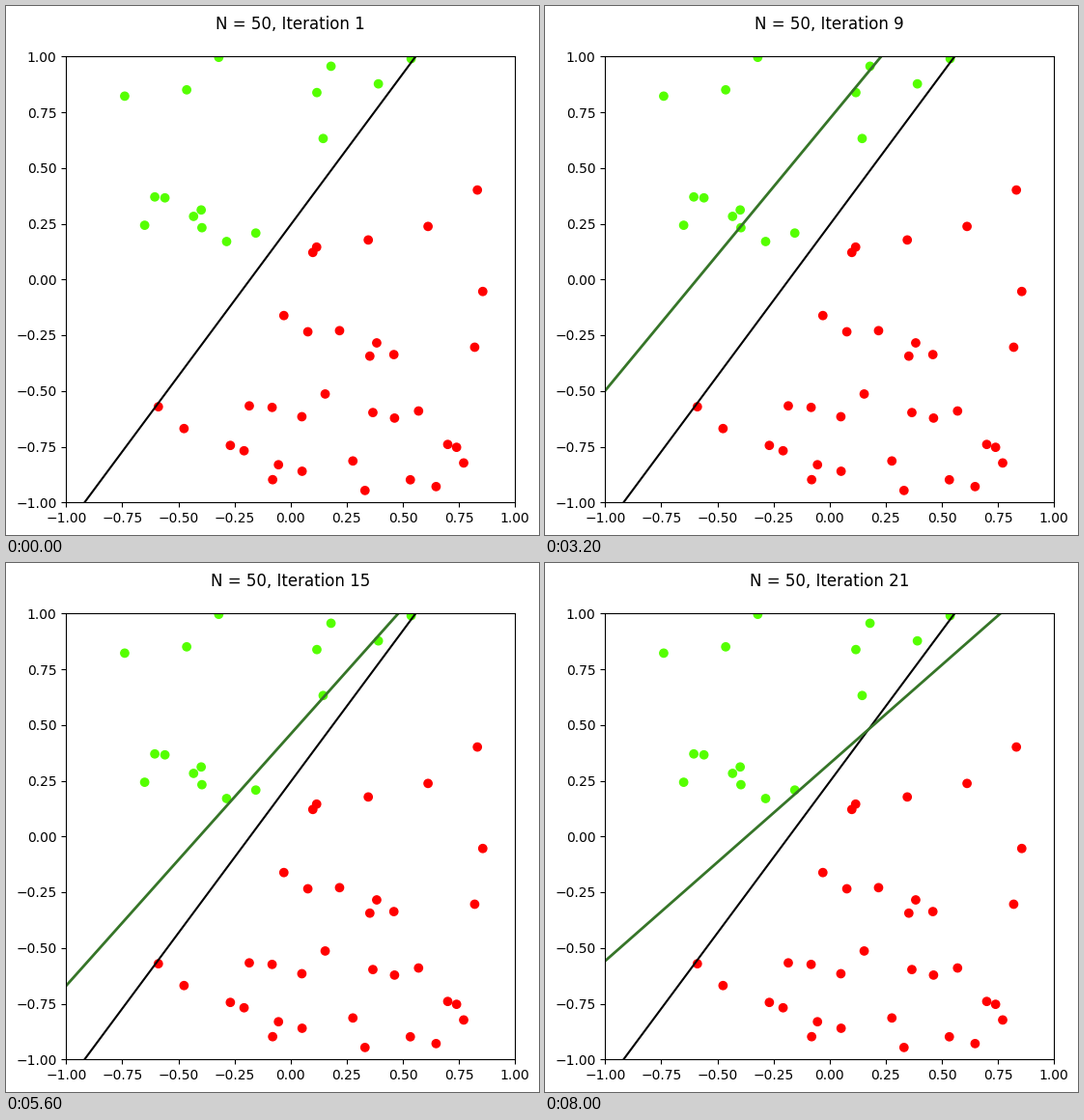
Animation, 552 px wide and 548 px high, one loop 8400 ms. Source, as a matplotlib script:

```python
from itertools import cycle

import matplotlib.pyplot as plt
import numpy as np
from matplotlib.animation import FuncAnimation

WIDTH, HEIGHT, DPI = 552, 548, 100
LEFT, RIGHT, TOP, BOTTOM = 62.25, 527.25, 52.25, 514.25
STEPS, INTERVAL = 21, 400
SLOPE, OFFSET = 1.356, .2447

# Points that steer the perceptron
HIGH, EDGE, WEST, NORTH = (.18, .956), (.391, .877), (-.65, .243), (.117, .838)
NEAR, MID = (-.155, .208), (-.285, .17)
FIRST, PAIR = (.353, -.344), [(.099, .121), (.116, .145)]
VISITS = [HIGH, NEAR, MID, WEST, NORTH, MID, MID, EDGE, NEAR, NEAR]

# Loose strands of bystanders: start, end, number of points
STRANDS = [
    ((-.739, .822), (-.32, .996), 3),
    ((.145, .632), (.537, .99), 2),
    ((-.605, .37), (-.395, .232), 5),
    ((.346, .177), (.832, .401), 3),
    ((-.03, -.162), (.46, -.337), 5),
    ((.82, -.304), (.856, -.054), 2),
    ((-.184, -.567), (.57, -.59), 7),
    ((-.589, -.571), (-.08, -.898), 5),
    ((-.054, -.831), (.648, -.929), 6),
    ((.7, -.74), (.771, -.823), 3),
]


def divider(x):
    return SLOPE * x + OFFSET


def strand(rng, start, end, n):
    """Points from start to end that stray from the line in between."""
    t = np.linspace(0, 1, n)[:, None]
    stray = rng.uniform(-.07, .07, (n, 2)) * 4 * t * (1 - t)
    return (1 - t) * np.array(start) + t * np.array(end) + stray


def scatter_points():
    rng = np.random.default_rng(4)
    steering = [HIGH, EDGE, WEST, NORTH, NEAR, MID, FIRST, *PAIR]
    return np.vstack([steering] + [strand(rng, *s) for s in STRANDS])


def train():
    """Perceptron weights (bias, x, y) after every update."""
    w = -np.array([1, *FIRST])
    history = [w]
    for above, below in zip(VISITS, cycle(PAIR)):
        w = w + np.array([1, *above])
        history.append(w)
        w = w - np.array([1, *below])
        history.append(w)
    return history


points = scatter_points()
weights = train()
xs = np.linspace(-1, 1)

fig = plt.figure(figsize=(WIDTH / DPI, HEIGHT / DPI), dpi=DPI, facecolor="white")
ax = fig.add_axes([LEFT / WIDTH, 1 - BOTTOM / HEIGHT,
                   (RIGHT - LEFT) / WIDTH, (BOTTOM - TOP) / HEIGHT])
ax.set_xlim(-1, 1)
ax.set_ylim(-1, 1)

is_above = points[:, 1] > divider(points[:, 0])
ax.scatter(*points.T, c=np.where(is_above, "#55ff00", "#ff0000"))
ax.plot(xs, divider(xs), "k-")
guess, = ax.plot([], [], color="#367528", lw=2)
title = ax.set_title("", fontsize=12, pad=5.3)


def draw(i):
    bias, wx, wy = weights[i]
    guess.set_data(xs, -(bias + wx * xs) / wy)
    title.set_text(f"N = {len(points)}, Iteration {i + 1}\n")
    return guess, title


anim = FuncAnimation(fig, draw, frames=STEPS, interval=INTERVAL,
                     repeat=True, repeat_delay=0, blit=False)
plt.show()
```
